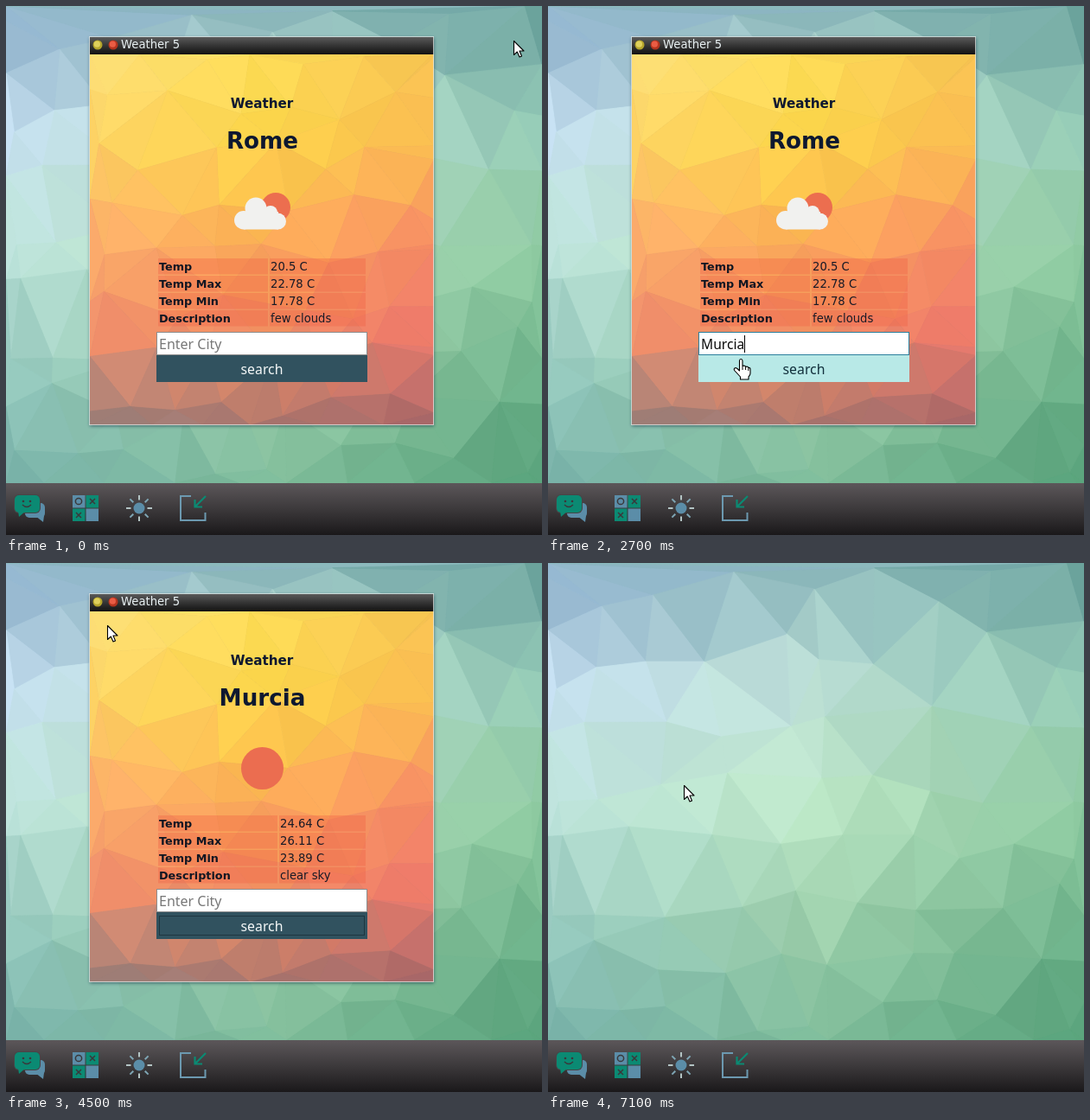
Recreate the animation shown at these times as an HTML page with a canvas. Size 620 by 612 pixels, loop 7200 ms.

```html
<!DOCTYPE html>
<html lang="en">
<head>
<meta charset="utf-8">
<title>Weather desktop</title>
<style>
html, body { margin: 0; width: 100%; height: 100%; overflow: hidden; background: #9ccdb0; }
canvas { display: block; width: 620px; height: 612px; }
</style>
</head>
<body>
<canvas id="stage" width="620" height="612"></canvas>
<script>
const ctx = document.getElementById('stage').getContext('2d');
const LOOP = 7200, STEP = 100;
const SANS = '"DejaVu Sans", Verdana, sans-serif';
const FORM = '"Noto Sans", "Open Sans", sans-serif';
const BLUE = '#5b8da8', GREEN = '#0b8a73', DARK = '#3a383b', INK = '#0d1830';

// Low-poly scenery: a jittered lattice, triangulated and tinted by a coarse gradient
const desk = {
  box: [0, 0, 620, 552], gap: 74, shade: 5, seed: 7,
  keys: [
    [62, 50], [122, 37], [308, 30], [452, 44], [508, 80], [113, 114],
    [181, 114], [376, 117], [137, 184], [281, 189], [320, 178], [444, 166]
  ],
  grid: [
    ['#88acc8', '#88b5b9', '#68a09c'],
    ['#c4def0', '#bfe2d8', '#92c8b4'],
    ['#bfe4dc', '#bce6c6', '#8fcaa0'],
    ['#98cac0', '#a0d2ae', '#70b48c'],
    ['#78b2aa', '#7cba98', '#55a078']
  ]
};
const sunset = {
  box: [97, 56, 495, 485], gap: 66, shade: 3, seed: 3, keys: [],
  grid: [
    ['#fde27c', '#fcdc58', '#f8c452'],
    ['#fed264', '#fcd648', '#fcba54'],
    ['#fdae6c', '#fdb056', '#f78a66'],
    ['#f2906e', '#f38f64', '#ee786c'],
    ['#967e7a', '#a87670', '#a66668']
  ]
};

const rgb = hex => [1, 3, 5].map(i => parseInt(hex.slice(i, i + 2), 16));
const mix = (a, b, k) => a.map((v, i) => v + (b[i] - v) * k);
const clamp = (v, lo, hi) => Math.min(hi, Math.max(lo, v));

// Seeded random numbers from -1 to 1
function random(seed) {
  return () => {
    seed = (seed * 16807) % 2147483647;
    return seed / 1073741823.5 - 1;
  };
}

function tint(grid, u, v) {
  const gx = u * (grid[0].length - 1), gy = v * (grid.length - 1);
  const i = Math.min(Math.floor(gx), grid[0].length - 2);
  const j = Math.min(Math.floor(gy), grid.length - 2);
  const row = r => mix(rgb(grid[r][i]), rgb(grid[r][i + 1]), gx - i);
  return mix(row(j), row(j + 1), gy - j);
}

function lattice({ box: [x0, y0, x1, y1], gap, keys }, rnd) {
  const pts = [[x0, y0], [x1, y0], [x0, y1], [x1, y1], ...keys];
  for (let row = 0, y = y0; y < y1 + gap; y += gap * 0.88, row++)
    for (let x = x0 - (row % 2) * gap / 2; x < x1 + gap; x += gap) {
      const p = [
        clamp(x + rnd() * gap * 0.28, x0, x1),
        clamp(y + rnd() * gap * 0.28, y0, y1)
      ];
      if (keys.every(k => Math.hypot(k[0] - p[0], k[1] - p[1]) > gap * 0.7)) pts.push(p);
    }
  return pts;
}

function circumcircle(a, b, c) {
  const d = 2 * (a[0] * (b[1] - c[1]) + b[0] * (c[1] - a[1]) + c[0] * (a[1] - b[1]));
  if (Math.abs(d) < 1) return null;
  const [p, q, r] = [a, b, c].map(([x, y]) => x * x + y * y);
  const x = (p * (b[1] - c[1]) + q * (c[1] - a[1]) + r * (a[1] - b[1])) / d;
  const y = (p * (c[0] - b[0]) + q * (a[0] - c[0]) + r * (b[0] - a[0])) / d;
  return [x, y, (a[0] - x) ** 2 + (a[1] - y) ** 2];
}

// Delaunay by the empty circle rule
function triangles(p) {
  const out = [];
  for (let i = 0; i < p.length; i++)
    for (let j = i + 1; j < p.length; j++)
      for (let k = j + 1; k < p.length; k++) {
        const c = circumcircle(p[i], p[j], p[k]);
        if (c && !p.some(q => (q[0] - c[0]) ** 2 + (q[1] - c[1]) ** 2 < c[2] - 0.01))
          out.push([p[i], p[j], p[k]]);
      }
  return out;
}

function polyScene(scene) {
  const [x0, y0, x1, y1] = scene.box;
  const cv = document.createElement('canvas');
  cv.width = 620;
  cv.height = 612;
  const g = cv.getContext('2d');
  const rnd = random(scene.seed);
  g.beginPath();
  g.rect(x0, y0, x1 - x0, y1 - y0);
  g.clip();
  for (const t of triangles(lattice(scene, rnd))) {
    const cx = (t[0][0] + t[1][0] + t[2][0]) / 3;
    const cy = (t[0][1] + t[1][1] + t[2][1]) / 3;
    const shade = scene.shade * rnd();
    const c = tint(scene.grid, (cx - x0) / (x1 - x0), (cy - y0) / (y1 - y0));
    g.fillStyle = g.strokeStyle = `rgb(${c.map(v => Math.round(v + shade))})`;
    g.beginPath();
    t.forEach(q => g.lineTo(q[0], q[1]));
    g.closePath();
    g.fill();
    g.lineWidth = 0.7;
    g.stroke();
  }
  return cv;
}
const deskArt = polyScene(desk), sunsetArt = polyScene(sunset);

// Drawing helpers
function rect(x, y, w, h, fill) {
  ctx.fillStyle = fill;
  ctx.fillRect(x, y, w, h);
}
function frame(x, y, w, h, color) {
  ctx.strokeStyle = color;
  ctx.lineWidth = 1;
  ctx.strokeRect(x + 0.5, y + 0.5, w - 1, h - 1);
}
function disc(x, y, r, fill) {
  ctx.fillStyle = fill;
  ctx.beginPath();
  ctx.arc(x, y, r, 0, 7);
  ctx.fill();
}
function bubble(x, y, w, h, r, fill) {
  ctx.fillStyle = fill;
  ctx.beginPath();
  ctx.roundRect(x, y, w, h, r);
  ctx.fill();
}
function line(d, color, width) {
  ctx.strokeStyle = color;
  ctx.lineWidth = width;
  ctx.stroke(new Path2D(d));
}
function text(s, x, y, font, color, align = 'left') {
  ctx.font = font;
  ctx.fillStyle = color;
  ctx.textAlign = align;
  ctx.fillText(s, x, y);
}
function fade(y0, y1, ...stops) {
  const g = ctx.createLinearGradient(0, y0, 0, y1);
  stops.forEach((c, i) => g.addColorStop(i / (stops.length - 1), c));
  return g;
}

function taskbar() {
  rect(0, 552, 620, 60, fade(552, 612, '#5c575a', '#3c393b', '#1a181a'));

  // chat
  bubble(22, 575, 23, 17, 5, BLUE);
  ctx.fill(new Path2D('M34 590H44L43 597Z'));
  bubble(9, 565, 31, 22, 6, '#484547');
  bubble(10, 566, 29, 20, 5, GREEN);
  ctx.fill(new Path2D('M14 584H23L15 591Z'));
  disc(20, 573, 1.3, DARK);
  disc(28, 573, 1.3, DARK);
  line('M19 577Q24 582 29 577', DARK, 1.4);

  // noughts and crosses
  for (let i = 0; i < 4; i++) {
    const col = i % 2, row = i >> 1;
    rect(77 + 15.5 * col, 566 + 15.5 * row, 14.5, 14.5, col === row ? BLUE : GREEN);
  }
  ctx.strokeStyle = DARK;
  ctx.lineWidth = 1.5;
  ctx.beginPath();
  ctx.arc(84, 573, 3.6, 0, 7);
  ctx.stroke();
  line('M97 570l6 6m0 -6l-6 6M81 586l6 6m0 -6l-6 6', DARK, 1.5);

  // sun
  disc(154, 581, 6.5, BLUE);
  for (let i = 0; i < 8; i++) {
    const a = i * Math.PI / 4, c = Math.cos(a), s = Math.sin(a);
    line(`M${154 + 9.5 * c} ${581 + 9.5 * s}L${154 + 15 * c} ${581 + 15 * s}`, i % 2 ? '#7fa6b5' : '#b3c4c4', 2);
  }

  // shrink
  line('M214 567H202V595H230.5V586', '#6c99b0', 2);
  line('M231 567L219 579M218.5 571V579.5H227', GREEN, 2.2);
}

const cities = {
  Rome: { split: 303, rows: ['20.5 C', '22.78 C', '17.78 C', 'few clouds'] },
  Murcia: { split: 314, rows: ['24.64 C', '26.11 C', '23.89 C', 'clear sky'] }
};
const labels = ['Temp', 'Temp Max', 'Temp Min', 'Description'];

function cloud() {
  const white = '#f1f1ef';
  disc(312, 233, 17, '#ec6e4f');
  bubble(264, 237, 22, 21.5, 10.7, white);
  disc(289, 234, 12.5, white);
  disc(306, 239, 8, white);
  disc(314.5, 249, 9.5, white);
  rect(275, 238, 40, 20.5, white);
}

function knob(x, light, base) {
  disc(x, 45, 5.5, base);
  disc(x - 0.6, 44.2, 3.6, light);
}

function weather(s) {
  ctx.save();
  ctx.shadowColor = 'rgba(10,45,65,.6)';
  ctx.shadowBlur = s.pressed ? 9 : 4;
  ctx.shadowOffsetY = s.pressed ? 3 : 1;
  rect(97, 36, 398, 449, '#888');
  ctx.restore();
  ctx.drawImage(sunsetArt, 0, 0);
  rect(97, 36, 398, 20, fade(36, 56, '#5a5a5a', '#343434', '#121212'));
  frame(96, 35, 399, 450, 'rgba(226,232,230,.75)');
  knob(106, '#dfd05c', '#b5a52c');
  knob(124, '#ea5c44', '#b5341f');
  text('Weather 5', 133, 49, '13.2px ' + SANS, '#e9f1f3');

  text('Weather', 296, 118, 'bold 15.2px ' + SANS, INK, 'center');
  text(s.city, 296.5, 165, 'bold 26.2px ' + SANS, INK, 'center');
  if (s.city === 'Rome') cloud();
  else disc(296.5, 237.5, 24.5, '#eb6d50');

  const { split, rows } = cities[s.city];
  rows.forEach((value, i) => {
    const y = 292 + 20 * i, cell = 'rgba(240,98,70,.38)';
    rect(176, y, split - 176, 18.5, cell);
    rect(split + 2, y, 414 - split, 18.5, cell);
    text(labels[i], 177, y + 14, 'bold 12.8px ' + SANS, '#101622');
    text(value, split + 3, y + 14, '13.2px ' + SANS, '#181a26');
  });

  rect(174, 377, 244, 27, '#fff');
  frame(174, 377, 244, 27, s.focus === 'input' ? '#2c7f9c' : s.overInput ? '#1d1d1d' : '#8d8d8d');
  if (s.typed) {
    text(s.typed, 177, 397, '15.6px ' + FORM, '#0a0a0a');
    rect(Math.floor(177 + ctx.measureText(s.typed).width), 381, 1, 20, '#000');
  } else {
    text('Enter City', 177, 397, '16px ' + FORM, '#777');
  }

  rect(174, 404, 244, 31, s.overButton ? '#b8e9e7' : '#31525f');
  if (s.focus === 'button') {
    ctx.setLineDash([1, 1]);
    frame(177, 408, 238, 23, '#0c1a22');
    ctx.setLineDash([]);
  }
  text('search', 296, 426, '15.8px ' + FORM, s.overButton ? '#12303c' : '#f4f8f8', 'center');
}

function pointer(kind, x, y) {
  ctx.save();
  ctx.translate(Math.round(x), Math.round(y));
  ctx.lineJoin = 'round';
  if (kind === 'beam') {
    line('M-3 -3.5H-1L.5 -2.5L2 -3.5H4M.5 -3V10M-3 11.5H-1L.5 10L2 11.5H4', '#111', 1);
  } else {
    const hand = kind === 'hand';
    const shape = hand
      ? 'M.5 11V1.5Q.5 -.5 2.2 -.5T4 1.5V7.5Q7 6.5 7.6 8.5Q10 7.5 10.8 9.5Q13 9 13 11.5V16Q13 18 11 20V23H1.5V20L-5 13Q-6.5 11 -5 10Q-3.5 9 -1.5 11L.5 13Z'
      : 'M.5 .5V16.5L4.3 13L7 19L9.5 18L7 12H12Z';
    ctx.fillStyle = '#fff';
    ctx.fill(new Path2D(shape));
    line(shape, '#000', 1.1);
    if (hand) line('M4 8V12M7.6 9V12M10.8 10V13', '#000', 1);
  }
  ctx.restore();
}

// Pointer moves: from time, to time, x, y
const home = [587, 40];
const moves = [
  [0, 800, 211, 402], [1500, 1700, 212, 399], [2500, 2700, 221, 409], [3500, 4000, 135, 137],
  [4000, 4700, 113, 56], [5000, 5100, 111, 49], [5500, 6000, 138, 186], [6200, 7000, 157, 257]
];
function pointerAt(t) {
  return moves.reduce((p, [from, to, x, y]) => {
    const k = clamp((t - from) / (to - from), 0, 1);
    return mix(p, [x, y], k * k * (3 - 2 * k));
  }, home);
}

function draw(t) {
  const [x, y] = pointerAt(t);
  const open = t < 5500;
  const inside = (l, top, r, b) => open && x >= l && x < r && y >= top && y < b;
  const s = {
    city: t < 3000 ? 'Rome' : 'Murcia',
    typed: t < 3000 ? 'Murcia'.slice(0, Math.max(0, (t - 1900) / 100)) : '',
    focus: t >= 1600 && t < 2800 ? 'input' : t >= 2800 && t < 5400 ? 'button' : '',
    pressed: t >= 5100,
    overInput: inside(174, 377, 418, 404),
    overButton: inside(174, 404, 418, 435)
  };
  ctx.drawImage(deskArt, 0, 0);
  taskbar();
  if (open) weather(s);
  const overKnob = inside(100, 39, 130, 51);
  pointer(s.overInput ? 'beam' : s.overButton || overKnob ? 'hand' : 'arrow', x, y);
}

const start = performance.now();
function tick() {
  const t = Math.max(0, performance.now() - start) % LOOP;
  draw(Math.floor(t / STEP) * STEP);
  requestAnimationFrame(tick);
}
tick();
</script>
</body>
</html>
```
